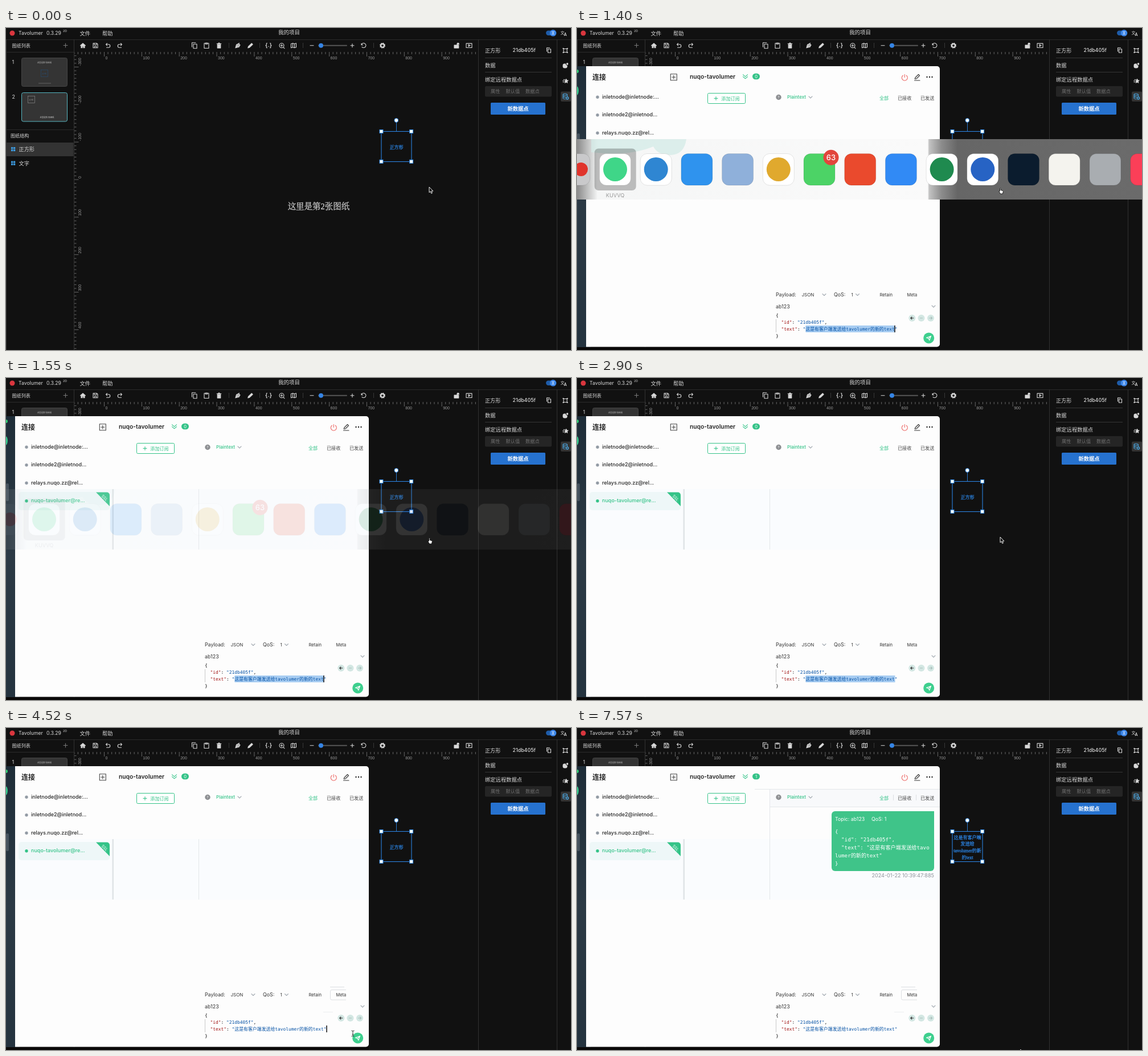
An HTML page for the animation above (8 s loop, 992 by 565 pixels).

```html
<!DOCTYPE html>
<html lang="zh-CN">
<head>
<meta charset="utf-8">
<style>
html, body { margin: 0; width: 100%; height: 100%; overflow: hidden; background: #111; }
svg { display: block; width: 992px; height: 565px; font-family: Inter, "Noto Sans CJK SC", "Noto Sans CJK", sans-serif; }
text { white-space: pre; }
.mono { font-family: "DejaVu Sans Mono", "Noto Sans CJK SC", monospace; }
.serif { font-family: "Liberation Serif", "Noto Serif CJK SC", "Noto Sans CJK SC", serif; stroke-width: .3px; }
.ruler { font-family: "Liberation Sans", sans-serif; }
</style>
</head>
<body>
<svg id="stage" viewBox="0 0 992 565"></svg>
<script>
const LOOP = 8000, GREEN = '#34c388', MINT = '#3ecf8e', BLUE = '#2b83e2', LIGHT = '#d8d8d8', INK = '#262626';
const NAME = 'tavolumer', CLIENT = 'nuqo-' + NAME;

const rect = (x, y, w, h, fill, more = '') => `<rect x="${x}" y="${y}" width="${w}" height="${h}" fill="${fill}" ${more}/>`;
const dot = (x, y, r, fill, more = '') => `<circle cx="${x}" cy="${y}" r="${r}" fill="${fill}" ${more}/>`;
const text = (x, y, size, str, fill = LIGHT, more = '') => `<text x="${x}" y="${y}" font-size="${size}" fill="${fill}" ${more}>${str}</text>`;
const line = (d, color, more = '') => `<path d="${d}" fill="none" stroke="${color}" ${more}/>`;
const icon = (x, y, d, color = LIGHT, more = '') => line(d, color, `transform="translate(${x} ${y})" stroke-width="1.1" stroke-linejoin="round" stroke-linecap="round" ${more}`);
const group = (id, body) => `<g id="${id}">${body}</g>`;
const MID = 'text-anchor="middle"', BOLD = 'font-weight="600"', MEDIUM = 'font-weight="500"', MONO = 'class="mono"';
const solid = color => `style="fill:${color}"`;
const serif = (x, y, size, str, color) => text(x, y, size, str, color, `${MID} class="serif" stroke="${color}"`);

function header() {
  return line('M0 20.5H992', '#2b2b2b') +
    dot(11, 9, 4.5, '#d9363e') +
    text(22, 12.3, 8.7, 'Tavolumer') + text(71, 12.3, 8.7, '0.3.29') + text(100, 6.8, 5.2, '2D') +
    text(129.5, 12.6, 9.3, '文件') + text(169, 12.6, 9.3, '帮助') +
    text(497, 11.3, 9.5, '我的项目', LIGHT, MID) +
    rect(948, 4.5, 18, 8.5, '#1e5ca8', 'rx="4.2"') + dot(960.5, 8.8, 5.8, '#3c86e8') +
    icon(960.5, 8.8, 'M-2 -2H0V2H2M-2 2H0M0 -2H2', '#cfe2fb') +
    text(973.5, 11, 7, '文') + text(979.5, 13.5, 7, 'A', LIGHT, BOLD);
}

function toolbar() {
  const marks = [
    [135, 'M-4.5 0L0 -4L4.5 0M-3 0V4H-1V1H1V4H3V0Z', solid(LIGHT)],
    [157, 'M-4 -4H2.5L4 -2.5V4H-4ZM-2 -4V-1.5H2V-4M-1.5 4V1H1.5V4'],
    [179, 'M-1.5 -4L-3.5 -2L-1.5 0M-3.5 -2H1A2.7 2.7 0 0 1 1 3.5H-2.5'],
    [200, 'M1.5 -4L3.5 -2L1.5 0M3.5 -2H-1A2.7 2.7 0 0 0 -1 3.5H2.5'],
    [331, 'M-2 -2.5H4V5H-2ZM-4.5 2.5V-5H2'],
    [352, 'M-4 -4H4V4.7H-4ZM-1.8 -4.5H1.8V-2.5H-1.8Z'],
    [374, 'M-3.8 -3.2H3.8M-1.2 -4.4H1.2M-2.8 -1.8H2.8V4.3H-2.8Z', solid(LIGHT)],
    [407, 'M-4 4L-2.5 -1.5L1.5 -3.5L4 -1L2 2.5ZM1.5 -3.5L2.5 -4.5M-4 4L0 0', solid('#aaa')],
    [429, 'M-4.2 4.2L-3.5 1.7L2.3 -4L4.2 -2L-1.7 3.5Z', solid(LIGHT)],
    [461, 'M-2.5 -4H-3.7V-1L-5 0L-3.7 1V4H-2.5M2.5 -4H3.7V-1L5 0L3.7 1V4H2.5M-.8 1.5H-.7M.8 1.5H.9'],
    [484, 'M4 0A4 4 0 1 0 -4 0A4 4 0 1 0 4 0M3 3L5 5M-2 0H2M0 -2V2'],
    [505, 'M-4.5 -3L-1.5 -4L1.5 -3L4.5 -4V3L1.5 4L-1.5 3L-4.5 4ZM-1.5 -4V3M1.5 -3V4'],
    [537, 'M-3 0H3'], [608, 'M-3 0H3M0 -3V3'],
    [628, 'M-4 -3.5V-1H-1.5M-4 -1A4 4 0 1 1 -3 2.5'],
    [791, 'M-4 -.8H3.8V4.3H-4ZM1 -.8V-3A1.6 1.6 0 0 1 4.2 -3V-2', solid(LIGHT)],
    [813, 'M-5 -3.7H5V3.7H-5ZM-1 -1.7L2 0L-1 1.7Z']
  ];
  return marks.map(([x, d, more]) => icon(x, 30.8, d, LIGHT, more)).join('') +
    line('M391.5 26V35M445.5 26V35M521.5 26V35M645.5 26V35', '#383838') +
    rect(548, 29.8, 51, 2, '#555', 'rx="1"') + dot(553, 30.8, 4, '#3585e5') +
    dot(661, 30.8, 3, 'none', `stroke="${LIGHT}" stroke-width="2.2"`) +
    dot(661, 30.8, 4.4, 'none', `stroke="${LIGHT}" stroke-width="1.3" stroke-dasharray="1.8 1.65"`);
}

function rulers() {
  const step = 6.585, x0 = 172.5, y0 = 266;
  let d = '', labels = '';
  for (let i = -33; i < 100; i++) {
    const x = x0 + i * step, y = y0 + i * step, major = i % 10 === 0, len = major ? 8 : 4;
    if (x > 119 && x < 829) {
      d += `M${x} 42v${len}`;
      if (major) labels += text(x + 2, 54.5, 7, i * 10, '#999', 'class="ruler"');
    }
    if (y > 46 && y < 565) {
      d += `M119.5 ${y}h${len}`;
      if (major) labels += text(0, 0, 7, i * 10, '#999', `class="ruler" transform="translate(132 ${y - 2}) rotate(-90)"`);
    }
  }
  return line(d, '#7d7d7d', 'stroke-width=".8"') + labels;
}

function sidebar() {
  const blocks = y => [0, 4].map(i => [0, 4].map(j => rect(9 + i, y + j, 3.3, 3.3, '#3d9be0', 'rx=".6"')).join('')).join('');
  return line('M119.5 20V565M.5 20V565', '#333') + line('M0 42.5H119M0 178.5H119', '#2b2b2b') +
    text(10.5, 33.5, 8.1, '图纸列表') + icon(104.5, 30.5, 'M-3.5 0H3.5M0 -3.5V3.5', '#777') +
    text(10.5, 62.5, 9, '1') + text(10.5, 123.5, 9, '2') +
    rect(27.5, 52.5, 80, 50, '#343434', 'rx="3" stroke="#454545"') +
    text(67.5, 61.5, 3.4, '这里是第1张图纸', '#bbb', MID) +
    rect(61.5, 73.5, 12, 12, 'none', 'stroke="#27496c" stroke-width=".7"') + text(67.5, 80.5, 2.6, '正方形', '#2b5a8c', MID) +
    line('M57 97H79', '#777', 'stroke-width=".7"') +
    rect(27.5, 113.5, 80, 50.5, '#343434', 'rx="3" stroke="#56b4c0"') +
    rect(38.5, 119.5, 12, 12, 'none', 'stroke="#888" stroke-width=".7"') + text(44.5, 126.5, 2.6, '正方形', '#aaa', MID) +
    text(72, 158.2, 3.3, '这里是第2张图纸', '#ccc', MID) +
    text(8, 192, 8.1, '图纸结构') + rect(0, 201, 118.5, 24, '#333') +
    blocks(209) + text(22.5, 216.3, 9.2, '正方形') + blocks(233.5) + text(22.5, 240.8, 9.2, '文字');
}

function panel() {
  return line('M829.5 20V565M967.5 20V565', '#303030') +
    text(841, 42.5, 9.1, '正方形') + text(889.5, 42.3, 8.9, '21db405f', LIGHT, MEDIUM) +
    icon(953, 39, 'M-1.5 -2H3.5V4.3H-1.5ZM-3.5 2V-4.2H1.5') +
    line('M841 52.5H958M841 77.5H958', '#363636') +
    text(841, 68.5, 9.2, '数据') + text(841, 93.5, 9.3, '绑定远程数据点') +
    rect(841, 102, 117, 18.5, '#252525', 'rx="2"') +
    text(851, 114, 8.2, '属性', '#707070') + text(877.5, 114, 8.2, '默认值', '#707070') + text(912, 114, 8.2, '数据点', '#707070') +
    rect(851, 131, 96, 21, '#2672cf', 'rx="1.5"') + text(899, 145, 9.3, '新数据点', '#fff', MID + ' ' + BOLD) +
    icon(982, 39.5, 'M-3 -3H3V3H-3Z') + [-3.5, 3.5].map(i => [-3.5, 3.5].map(j => rect(981 + i, 38.5 + j, 2, 2, LIGHT)).join('')).join('') +
    rect(977.5, 62.5, 8, 8, LIGHT, 'rx="3"') + dot(985.5, 63, 2.3, LIGHT, 'stroke="#111"') +
    icon(983.5, 93, 'M0 -3.5L1 -1.2L3.5 -1L1.5 .7L2.2 3.2L0 1.8L-2.2 3.2L-1.5 .7L-2 0Z', LIGHT, solid(LIGHT)) +
    icon(983.5, 93, 'M-2.5 -2.5H-4.5M-3.5 -.3H-6M-4 2H-5.5') +
    rect(974, 111.5, 18, 17.5, '#333', 'rx="2"') +
    icon(982, 120, 'M-4 -3.2A3.7 1.5 0 0 1 3.4 -3.2A3.7 1.5 0 0 1 -4 -3.2V3.5Q-3 4.7 0 4.7M3.4 -3.2V0M-4 0Q-2.5 1.4 .5 1', '#4aa3dc') +
    dot(985.5, 123, 2, 'none', 'stroke="#4aa3dc" stroke-width="1.4"');
}

function board() {
  const lines = ['这是有客户端', '发送给', NAME + '的新', '的text'];
  return serif(549, 317.7, 14.5, '这里是第2张图纸', '#c8c8c8') +
    rect(659, 181.5, 53, 53, 'none', `stroke="${BLUE}" stroke-width="1.1"`) + line('M685.5 162V181', BLUE, 'stroke-width=".9"') +
    [659, 711.7].map(x => [181.5, 234.3].map(y => rect(x - 3, y - 3, 6, 6, '#fff', `stroke="${BLUE}"`)).join('')).join('') +
    dot(685.3, 162, 3.4, '#fff', `stroke="${BLUE}"`) +
    group('oldText', serif(685.5, 212.3, 8, '正方形', BLUE)) +
    group('newText', lines.map((s, i) => serif(685.5, 194.5 + i * 11.8, 8, s, BLUE)).join(''));
}

function message() {
  const rows = ['{', '  "id": "21db405f",', '  "text": "这是有客户端发送给' + NAME.slice(0, 4), NAME.slice(4) + '的新的text"', '}'];
  return rect(339, 108, 298, 30, '#f8f9fb') +
    line('M312 107.5H637M338.5 107V301M339 138.5H637', '#e4e7ea') + line('M555.5 117V127M595.5 117V127', '#dcdfe2') +
    rect(447, 146, 180, 105, '#3fc489', 'rx="6"') + rect(619, 146, 8, 8, '#3fc489') +
    text(453, 163, 8.8, 'Topic: ab123', '#fff') + text(517, 163, 8.8, 'QoS: 1', '#fff') +
    rows.map((s, i) => text(453, 185 + i * 14, 9.2, s, '#fff', MONO)).join('') +
    text(627, 262, 9.1, '2024-01-22 10:39:47:885', '#8f949a', 'text-anchor="end"');
}

function editor() {
  const key = '#a31515', value = '#0451a5';
  const span = (s, fill) => `<tspan fill="${fill}">${s}</tspan>`;
  const pair = (y, k, v, end = '') => text(358.5, y, 7.9, span(`"${k}"`, key) + ': ' + span(`"${v}"`, value) + end, '#111', MONO);
  return line('M349.5 511V534', '#c9c9c9') + rect(401.5, 522, 157, 12, '#a8cdf2', 'id="picked"') +
    text(349, 507, 7.9, '{', '#111', MONO) + pair(519, 'id', '21db405f', ',') +
    pair(531, 'text', `这是有客户端发送给${NAME}的新的text`) + text(349, 542.5, 7.9, '}', '#111', MONO) +
    rect(557.2, 522, 1.5, 12, '#111', 'id="caret"');
}

function client() {
  const down = (x, y) => icon(x, y, 'M-3 -1.5L0 1.5L3 -1.5', '#a4abb2');
  const rows = ['inletnode@inletnode:...', 'inletnode2@inletnod...', 'relays.nuqo.zz@rel...', CLIENT + '@re...'];
  const arrows = ['M2.5 0H-2.5L-.5 -2M-2.5 0L-.5 2', 'M-2 0H2', 'M-2.5 0H2.5L.5 -2M2.5 0L.5 2'];
  return rect(0, 67, 24, 493, 'url(#strip)') + rect(0, 185, 5, 31, '#46535e', 'rx="2"') +
    dot(0, 76, 3, '#2ecc71') + `<ellipse cx="-1" cy="110" rx="4" ry="8" fill="${GREEN}"/>` +
    rect(0, 560, 637, 5, '#0a0909') +
    '<path d="M16 67H632a5 5 0 0 1 5 5V554.5a5 5 0 0 1 -5 5H16Z" fill="#fdfdfd"/>' +
    rect(16, 195, 621, 106, '#fafcfe') + rect(186.5, 195, 2.5, 106, '#dfe3e6') + line('M338.5 195V301', '#e4e7ea') +
    group('message', message()) +
    text(27, 90.8, 12, '连接', INK, 'font-weight="700"') + icon(169.8, 86.3, 'M-5.5 -5.5H5.5V5.5H-5.5ZM-3 0H3M0 -3V3', '#444') +
    text(198, 89, 10.3, CLIENT, INK, BOLD) + icon(295.5, 85.3, 'M-4 -3.5L0 0L4 -3.5M-4 0L0 3.5L4 0', GREEN) +
    rect(308, 79.7, 13, 10.5, GREEN, 'rx="5.2"') +
    group('zero', text(314.5, 88, 7.5, '0', '#fff', MID)) + group('one', text(314.5, 88, 7.5, '1', '#fff', MID)) +
    icon(575.3, 87, 'M-3 -3.8A5 5 0 1 0 3 -3.8M0 -5.5V-.5', '#ec6a67') +
    icon(597, 86.5, 'M-3.8 3L-3 .5L2.5 -5L4.5 -3L-1 2.5ZM-4.5 5.5H5', '#333') +
    [614.5, 619, 623.5].map(x => dot(x, 86, 1.2, '#222')).join('') +
    rect(22, 200, 160, 32, '#eef7f8', 'rx="5"') + `<path d="M158 200.5H177a5 5 0 0 1 5 5V225Z" fill="${GREEN}"/>` +
    text(0, 0, 7, 'SSL', '#fff', `${MID} transform="translate(171.5 212) rotate(45)"`) +
    rows.map((s, i) => {
      const on = i === 3, y = 120.5 + i * 31.5;
      return dot(36, y + .7, 2.7, on ? GREEN : '#939ba5') + text(44, y + 3.2, 9, s, on ? GREEN : INK, MEDIUM);
    }).join('') +
    rect(229.5, 114.5, 66, 18, '#fff', `rx="2" stroke="${GREEN}"`) + icon(244, 123.5, 'M-3 0H3M0 -3V3', GREEN) +
    text(253.3, 126.6, 8.1, '添加订阅', GREEN) +
    dot(354, 121.5, 4.7, '#8d8f92') + text(354, 124, 6.5, '?', '#fff', MID) +
    text(369, 124.2, 8, 'Plaintext', GREEN, MEDIUM) + down(410, 121.5) +
    text(531, 125.5, 8.1, '全部', GREEN) + text(563, 125.5, 8.1, '已接收', '#444') + text(603, 125.5, 8.1, '已发送', '#444') +
    group('meta', line('M569 454.5H594M597 459.5H572a2.5 2.5 0 0 0 -2.5 2.5V474.5a2.5 2.5 0 0 0 2.5 2.5H597', '#dcdfe2') + line('M557 498.5H574', '#eceef0')) +
    text(349, 471.3, 8.8, 'Payload:', '#333') + text(394.5, 471, 8, 'JSON', '#333') + down(434, 468) +
    text(451, 471.3, 8.8, 'QoS:', '#333') + text(481.5, 471, 8, '1', '#333') + down(492.5, 468) +
    text(531.5, 471, 7.7, 'Retain', '#333') + text(579.5, 471, 7.4, 'Meta', '#333') +
    text(349, 491.5, 8.9, 'ab123', '#333') + down(626, 488.5) + editor() +
    [588.3, 604.5, 621].map((x, i) => dot(x, 509, 6, '#d3e7e3') + icon(x, 509, arrows[i], i ? '#a9bfbb' : '#333')).join('') +
    dot(617.7, 544, 9.5, MINT) + icon(617.5, 544, 'M-4 -.5L4 -3.5L1.3 4L-.5 .8ZM-.5 .8L4 -3.5', '#fff');
}

function switcher() {
  // [tile colour, mark colour]
  const apps = [['#c9c9cb', '#e0342c'], ['#fff', '#3fd688'], ['#fff', '#2f86d2'], ['#2f93ee'], ['#8fb0da'], ['#fff', '#e0a92e'], ['#4cd366'],
    ['#ea4a2d'], ['#318af5'], ['#fff', '#1f8a4f'], ['#fff', '#2763c4'], ['#0b1c2e'], ['#f4f3ee'], ['#a9adb1'], ['#fb3f58']];
  const tiles = apps.map(([tile, mark], i) => {
    const x = -4.7 + i * 71.7;
    return rect(x - 27.5, 220.5, 55, 55.5, tile, 'rx="12" stroke="#000" stroke-opacity=".13" stroke-width=".8"') +
      (mark ? dot(i ? x : 7, 248, i ? 21 : 12, mark) : '');
  }).join('');
  return group('darkBack', rect(0, 195, 992, 106, 'url(#dark)')) +
    group('lightBack', rect(0, 195, 992, 106, 'url(#glass)') + '<path d="M25 195H192Q188 223 163 223Q142 223 134 208Q90 226 25 218Z" fill="#d3ebe7" opacity=".75"/>') +
    rect(0, 211.5, 73, 73.5, '#000', 'id="focus" rx="7" fill-opacity=".35"') + tiles +
    dot(446, 227.3, 13.5, '#e2463c') + text(446, 231.9, 13, '63', '#fff', MID + ' ' + MEDIUM) +
    group('label', text(67, 297, 9.2, 'KUVVQ', 'currentColor', MID));
}

const stops = list => list.map(([x, c]) => `<stop offset="${x / 992}" stop-color="${c}"/>`).join('');
const ramp = (id, list) => `<linearGradient id="${id}" gradientUnits="userSpaceOnUse" x1="0" x2="992">${stops(list)}</linearGradient>`;
const stage = document.getElementById('stage');
stage.innerHTML = '<defs>' +
  ramp('dark', [[0, '#777'], [640, '#6f6f6f'], [688, '#6c737c'], [740, '#6c6c6c'], [992, '#6b6b6b']]) +
  ramp('glass', [[0, '#8a8a8a'], [32, '#e8e9e9'], [36, '#f5f6f6'], [616, '#fafafa'], [618, '#c4c4c4'], [640, '#8c8c8c'], [668, '#666'], [992, '#6b6b6b']]) +
  '<linearGradient id="strip" x2="0" y2="1"><stop stop-color="#1e2d38"/><stop offset=".5" stop-color="#2c3a45"/><stop offset="1" stop-color="#24333f"/></linearGradient></defs>' +
  rect(0, 0, 992, 565, '#111') + header() + toolbar() + rulers() + sidebar() + panel() + board() +
  group('client', client()) + group('switcher', switcher()) +
  group('arrow', '<path d="M0 0V9.7L2.2 7.7L3.7 11.3L5.4 10.5L3.9 7.1H6.9Z" fill="#111" stroke="#fff" stroke-width=".9"/>') +
  group('beam', line('M-2.5 -5Q0 -5 0 -3.5V3.5Q0 5 -2.5 5M2.5 -5Q0 -5 0 -3.5M0 3.5Q0 5 2.5 5M-1.2 1.5H1.2', '#222', 'stroke-width=".9"')) +
  group('hand', '<path transform="translate(-2 1.5)" d="M1.5 5.5V1Q2.3 -.3 3.1 1V4L6.5 5Q7.5 5.5 7.2 7L6.3 10.5H2.5L0 6.5Q.2 5 1.5 5.5Z" fill="#fff" stroke="#111" stroke-width=".9"/>');

const el = id => document.getElementById(id);
const show = (id, on) => { el(id).style.visibility = on ? 'visible' : 'hidden'; };

// time, x, y
const track = [
  [0, 743, 279], [3080, 743, 279], [3320, 668, 440], [3500, 608, 533], [3710, 573, 529], [3860, 573, 529], [4010, 575, 530],
  [4370, 575, 530], [4520, 609, 536], [4670, 622, 536], [4910, 622, 536], [5000, 618, 537.5], [5120, 618, 537.5], [5300, 617.5, 541],
  [7400, 617.5, 541], [7480, 652, 535], [7540, 768, 556], [7570, 800, 580], [LOOP, 800, 580]
];
// time, value
const shapes = [[0, 'arrow'], [590, 'hand'], [1610, 'arrow'], [3440, 'beam'], [4580, 'hand'], [7460, 'arrow']];
const fade = [[0, 0], [500, 1], [1430, .8], [1480, .55], [1510, .32], [1550, .14], [1580, .06], [1610, 0]];
const blink = [[0, 1], [1910, 0], [2390, 1], [2900, 0], [3410, 1], [3890, 0], [4010, 1], [5150, 0]];
const at = (table, t) => table.filter(row => row[0] <= t).pop()[1];

// The pointer moves in 30 ms steps.
function pointer(t) {
  const q = Math.max(0, Math.floor((t - 20) / 30) * 30 + 20);
  const i = track.findIndex(k => k[0] > q), [t0, x0, y0] = track[i - 1], [t1, x1, y1] = track[i];
  const p = (q - t0) / (t1 - t0);
  return [x0 + (x1 - x0) * p, y0 + (y1 - y0) * p];
}

function draw(t) {
  const open = t >= 1400, sent = t >= 5540, clicked = t >= 4160, bar = at(fade, t);
  el('client').style.display = open ? '' : 'none';
  el('switcher').style.display = bar ? '' : 'none';
  el('switcher').style.opacity = bar;
  show('darkBack', !open);
  show('lightBack', open);
  el('focus').setAttribute('x', t < 1070 ? -41 : 30.7);
  el('focus').setAttribute('fill-opacity', open ? .24 : .35);
  el('label').style.color = open ? '#999' : '#000';
  show('label', t >= 1070);
  show('picked', !clicked);
  show('caret', at(blink, t));
  el('caret').setAttribute('x', clicked ? 562.3 : 557.2);
  show('meta', t >= 3500);
  show('message', sent);
  show('one', sent);
  show('zero', !sent);
  show('newText', sent);
  show('oldText', !sent);
  const [x, y] = pointer(t), shape = at(shapes, t);
  for (const id of ['arrow', 'beam', 'hand']) {
    show(id, id === shape);
    el(id).setAttribute('transform', `translate(${x} ${y})`);
  }
}

const start = performance.now();
function tick() {
  draw((performance.now() - start) % LOOP);
  requestAnimationFrame(tick);
}
tick();
</script>
</body>
</html>
```
